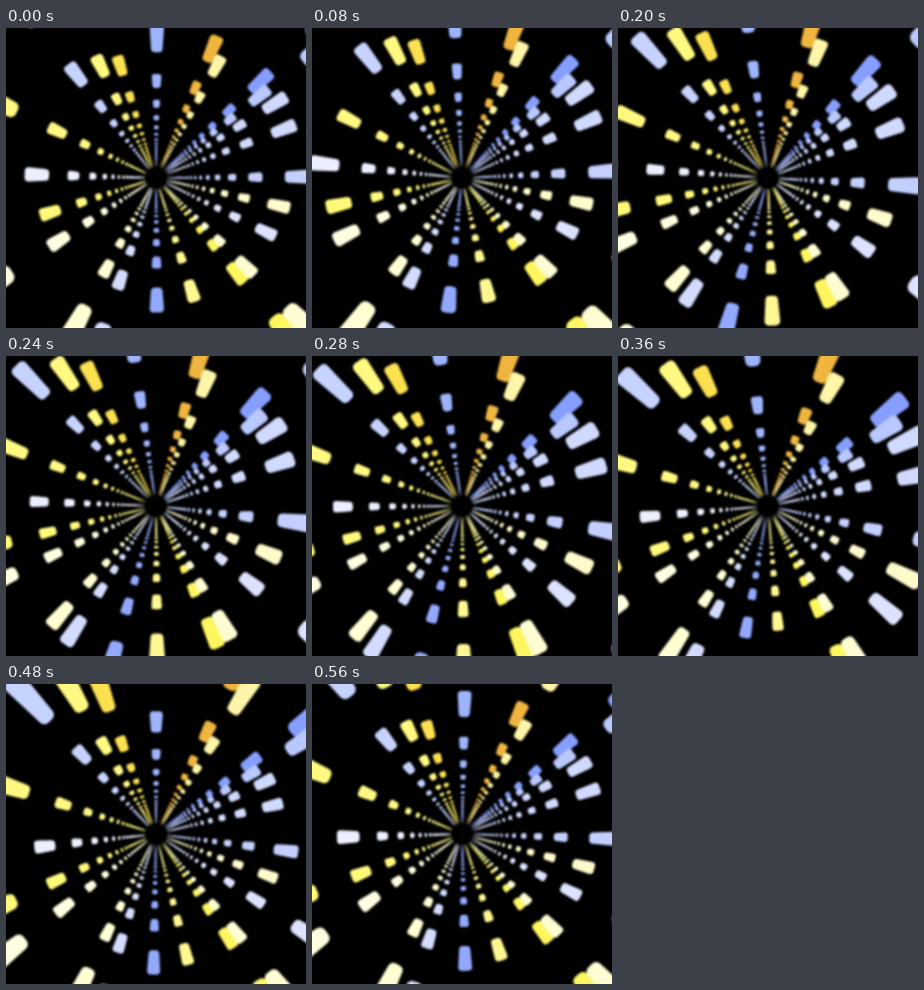
These frames come from a looping animation (300x300 px, 600 ms). An HTML page with a canvas:

```html
<!DOCTYPE html>
<html>
<head>
<meta charset="utf-8">
<style>
html, body { margin: 0; width: 100%; height: 100%; overflow: hidden; background: #000; }
canvas { display: block; }
</style>
</head>
<body>
<canvas id="stage" width="300" height="300"></canvas>
<script>
const stage = document.getElementById('stage').getContext('2d');
const layer = document.createElement('canvas');
layer.width = layer.height = 320;
const ctx = layer.getContext('2d');

const LOOP = 600, STEP = 40, TAU = Math.PI * 2, DEG = TAU / 360;
const RADIUS = 298, RINGS = 30, HALF_LENGTH = .235, HALF_WIDTH = 14.7, MIN_ROUND = 1.2;

// Rails along the tunnel wall: angle in degrees, depth shift, colour
const rails = [
  [-95, 0, '#9fb4ff'], [-69.8, .06, '#efb53e'], [-64.4, .32, '#fdf6a8'],
  [-43.5, .07, '#869eff'], [-38.6, .25, '#b9c8ff'], [-31.6, .1, '#d0daff'],
  [-19.2, .155, '#d0daff'], [3.4, 0, '#c3cfff'], [17.7, .27, '#fffacb'],
  [32, .285, '#dde3ff'], [56.4, .12, '#fdf65f'], [51.2, .12, '#fefcd2'],
  [78.8, .14, '#fff892'], [95, 0, '#93a9ff'], [113, .22, '#d3dcff'],
  [121.4, .31, '#fffdd2'], [146.7, .01, '#fffde0'], [159.8, .115, '#fff97a'],
  [177.5, 0, '#eceffe'], [-160.4, .295, '#fff982'], [-134.3, 0, '#c6d3ff'],
  [-122.9, .155, '#fff981'], [-114, .34, '#fbe050']
];

function drawDash(x, y, depth, colour) {
  const dist = Math.hypot(x, y), ux = x / dist, uy = y / dist;
  const far = depth + HALF_LENGTH, near = depth - HALF_LENGTH;
  const middle = (dist / near + dist / far) / 2, half = dist / near - middle;
  const round = Math.max(MIN_ROUND, Math.min(9 / depth, half));
  const inset = size => Math.max(0, size - round);
  const corner = (r, w) => ctx.lineTo(ux * r - uy * w, uy * r + ux * w);
  const farW = inset(HALF_WIDTH / far), nearW = inset(HALF_WIDTH / near);
  const reach = inset(half) + .01;
  ctx.beginPath();
  corner(middle - reach, -farW);
  corner(middle + reach, -nearW);
  corner(middle + reach, nearW);
  corner(middle - reach, farW);
  ctx.closePath();
  ctx.lineWidth = round * 2;
  ctx.fillStyle = ctx.strokeStyle = colour;
  ctx.fill();
  ctx.stroke();
}

function draw(phase) {
  const orbit = TAU * (150 / 360 - phase);
  const camX = 2.5 + 35 * Math.cos(orbit), camY = 3 + 35 * Math.sin(orbit);
  const roll = .031 + .033 * Math.cos(TAU * (phase - 159 / 360));

  ctx.setTransform(1, 0, 0, 1, 160, 160);
  ctx.fillStyle = '#000';
  ctx.fillRect(-160, -160, 320, 320);
  ctx.lineJoin = 'round';
  for (let ring = RINGS; ring > 0; ring--) {
    for (const [degrees, shift, colour] of rails) {
      const depth = ring + .29 + shift - phase;
      if (depth < .6) continue;
      const light = Math.min(1, Math.max(0, (30 - depth) / 20));
      const angle = degrees * DEG + roll;
      drawDash(RADIUS * Math.cos(angle) - camX, RADIUS * Math.sin(angle) - camY, depth,
        `color-mix(in srgb, ${colour} ${light * 100}%, black)`);
    }
  }
  // Dark end of the tunnel
  ctx.fillStyle = '#000';
  ctx.beginPath();
  ctx.arc(0, 0, 11, 0, TAU);
  ctx.fill();

  stage.filter = 'blur(1.2px)';
  stage.drawImage(layer, -10, -10);
}

function tick(now) {
  draw(Math.floor(now % LOOP / STEP) * STEP / LOOP);
  requestAnimationFrame(tick);
}
tick(performance.now());
</script>
</body>
</html>
```
